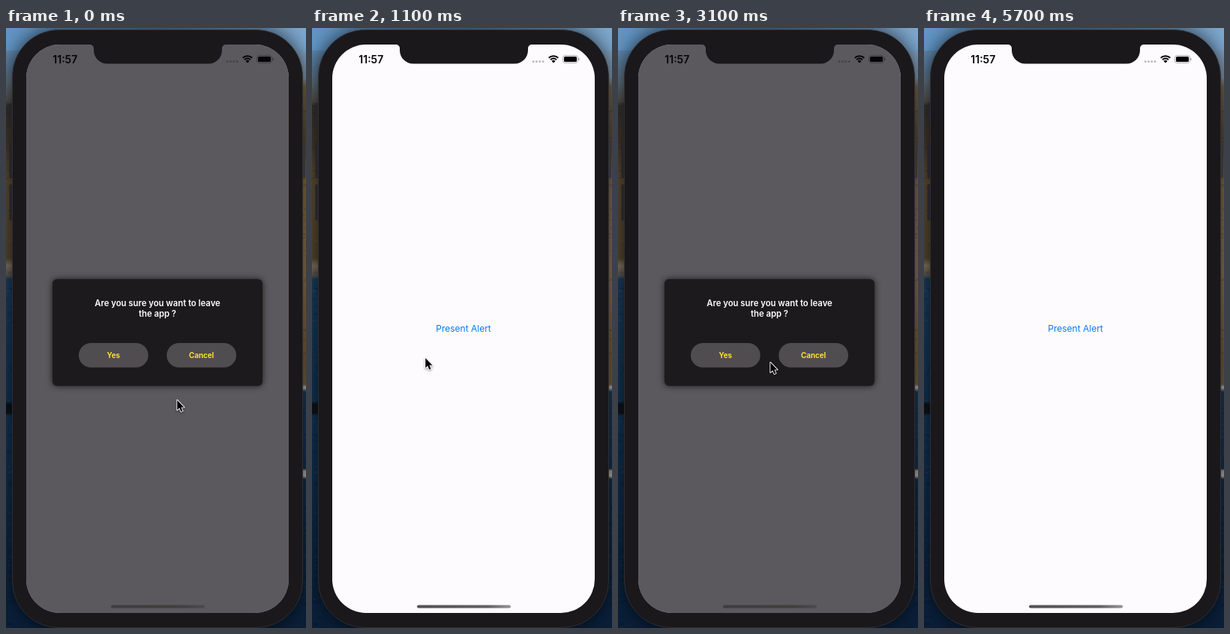
An HTML page with a canvas that plays this animation: 400x798 px, repeating every 5800 ms.

```html
<!DOCTYPE html>
<html lang="en">
<head>
<meta charset="utf-8">
<title>Present Alert</title>
<style>
  html, body { margin: 0; width: 100%; height: 100%; overflow: hidden; background: #1a181b; }
  canvas { display: block; }
</style>
</head>
<body>
<canvas id="stage" width="400" height="798"></canvas>
<script>
const W = 400, H = 798, LOOP = 5800, STEP = 100;
const FONT = 'Inter, Roboto, sans-serif';
const ctx = document.getElementById('stage').getContext('2d');

function makeLayer() {
  const c = document.createElement('canvas');
  c.width = W;
  c.height = H;
  return c.getContext('2d');
}

const clamp = x => Math.max(0, Math.min(1, x));
const mix = (a, b, k) => a + (b - a) * k;
const ease = x => { x = clamp(x); return x * x * (3 - 2 * x); };
const ramp = (t, start, length) => ease((t - start) / length);

function box(c, x, y, w, h, r, fill) {
  c.beginPath();
  c.roundRect(x, y, w, h, r);
  c.fillStyle = fill;
  c.fill();
}

function label(c, text, x, y, size, weight, fill, align = 'center') {
  c.font = `${weight} ${size}px ${FONT}`;
  c.textAlign = align;
  c.fillStyle = fill;
  c.fillText(text, x, y);
}

// Coastal wallpaper: each side is a vertical list of [y, colour]
const LEFT = [[0, '#6296c6'], [50, '#5a7c9c'], [72, '#5f707c'], [98, '#524e48'], [104, '#34302a'],
  [150, '#41372c'], [200, '#5c4a30'], [306, '#54452e'], [316, '#84745f'], [330, '#565250'],
  [334, '#1a3c5e'], [496, '#103252'], [501, '#0d1219'], [512, '#0d1219'], [516, '#113456'],
  [798, '#091e38']];
const RIGHT = [[0, '#7ea8ce'], [66, '#8299b0'], [78, '#786648'], [150, '#544838'], [205, '#826b43'],
  [320, '#8c744e'], [440, '#765e3a'], [474, '#746246'], [478, '#c8c4bc'], [484, '#1a3856'],
  [586, '#123050'], [589, '#b0a494'], [596, '#c0b8ac'], [600, '#122e4c'], [798, '#091e38']];

function strip(c, x, w, stops) {
  const g = c.createLinearGradient(0, 0, 0, H);
  stops.forEach(([y, colour]) => g.addColorStop(y / H, colour));
  c.fillStyle = g;
  c.fillRect(x, 0, w, H);
}

function wallpaper(c) {
  strip(c, 0, 200, LEFT);
  strip(c, 200, 200, RIGHT);
  const sky = c.createLinearGradient(0, 0, W, 0);
  sky.addColorStop(0, '#6296c6');
  sky.addColorStop(0.5, '#54789c');
  sky.addColorStop(1, '#7ea8ce');
  c.fillStyle = sky;
  c.fillRect(0, 0, W, 30);
  let seed = 7;
  const rnd = () => (seed = seed * 16807 % 2147483647) / 2147483647;
  for (let i = 0; i < 200; i++) {
    const y = 105 + rnd() * 690;
    c.fillStyle = rnd() < 0.6 ? 'rgba(0,0,0,.13)' : 'rgba(170,170,160,.06)';
    c.fillRect(rnd() < 0.5 ? rnd() * 8 : 391 + rnd() * 8, y, 2 + rnd() * 4, 1 + rnd() * 2);
  }
}

function phone(c) {
  c.save();
  c.shadowColor = 'rgba(0,0,0,.7)';
  c.shadowBlur = 26;
  box(c, 8.5, 2.5, 387, 795, 62, '#1a181b');
  c.restore();
  [[100, 28], [152, 48], [208, 48]].forEach(([y, h]) => box(c, 4.5, y, 6, h, 1.5, '#252429'));
  box(c, 394, 152, 5, 48, 1.5, '#353436');
  box(c, 8.5, 2.5, 387, 795, 62, '#1a181b');
  c.strokeStyle = '#39383c';
  c.lineWidth = 0.7;
  c.stroke();
}

function screenPath(c) {
  c.beginPath();
  c.roundRect(27, 22, 350, 756, 45);
}

function notch(c) {
  c.beginPath();
  c.moveTo(112, 21);
  c.lineTo(112, 22);
  c.arcTo(117, 22, 117, 27, 5);
  c.arcTo(117, 47.5, 135, 47.5, 18);
  c.arcTo(288, 47.5, 288, 27, 18);
  c.arcTo(288, 22, 293, 22, 5);
  c.lineTo(293, 21);
  c.fillStyle = '#1a181b';
  c.fill();
}

function statusBar(c) {
  label(c, '11:57', 62.3, 46.6, 14, 600, '#000', 'left');
  for (let i = 0; i < 4; i++) box(c, 293.7 + i * 4.3, 43.2, 2.9, 2.9, 1.45, '#b9b7ba');
  c.strokeStyle = '#000';
  c.lineWidth = 2;
  [9, 5.7].forEach(r => {
    c.beginPath();
    c.arc(322, 46.3, r, -Math.PI / 2 - 0.77, -Math.PI / 2 + 0.77);
    c.stroke();
  });
  c.beginPath();
  c.moveTo(322, 46.6);
  c.arc(322, 46.6, 3.6, -Math.PI / 2 - 0.77, -Math.PI / 2 + 0.77);
  c.fillStyle = '#000';
  c.fill();
  c.beginPath();
  c.roundRect(334.6, 36.6, 19.8, 9.8, 2.8);
  c.strokeStyle = '#a3a1a4';
  c.lineWidth = 0.9;
  c.stroke();
  box(c, 336, 38, 17, 7, 1.6, '#000');
  box(c, 355.2, 39.8, 1.3, 3.4, 0.6, '#a3a1a4');
}

function alertView(c, scale) {
  c.clearRect(0, 0, W, H);
  c.fillStyle = 'rgba(9,5,10,.66)';
  c.fillRect(0, 0, W, H);
  c.save();
  c.translate(202, 405);
  c.scale(scale, scale);
  c.translate(-202, -405);
  c.save();
  c.shadowColor = 'rgba(0,0,0,.75)';
  c.shadowBlur = 9;
  box(c, 62, 334, 280, 142, 6, '#1c1a1d');
  c.restore();
  label(c, 'Are you sure you want to leave', 202, 370, 11.3, 600, '#fff');
  label(c, 'the app ?', 202, 383.6, 11.3, 600, '#fff');
  [['Yes', 97], ['Cancel', 214.3]].forEach(([text, x]) => {
    box(c, x, 419, 92.7, 32.6, 16.3, '#504d51');
    label(c, text, x + 46.3, 439, 9.8, 700, '#fce02f');
  });
  c.restore();
}

function homeBar(c, dim) {
  const grey = v => `rgb(${v},${v - 2},${v})`;
  const g = c.createLinearGradient(140, 0, 265, 0);
  g.addColorStop(0, grey(mix(82, 62, dim)));
  g.addColorStop(0.75, grey(mix(98, 64, dim)));
  g.addColorStop(1, grey(mix(150, 76, dim)));
  box(c, 140, 767.6, 125, 4, 2, g);
}

// Pointer stops: [time, x, y]
const PATH = [[0, 228, 494], [100, 226, 492], [600, 151, 438], [1300, 151, 438], [1800, 197, 398],
  [2700, 197, 398], [3100, 203, 444], [3400, 226, 474], [3700, 246, 448], [4100, 266, 437],
  [5350, 266, 437], [5650, 408, 330], [LOOP, 420, 320]];

function pointer(c, t) {
  const i = PATH.findIndex(p => p[0] > t);
  const [t0, x0, y0] = PATH[i - 1], [t1, x1, y1] = PATH[i];
  const k = ramp(t, t0, t1 - t0);
  c.save();
  c.translate(mix(x0, x1, k), mix(y0, y1, k) + 1);
  c.scale(0.92, 0.92);
  c.beginPath();
  [[0.3, 0], [0.3, 14.2], [3.6, 11.1], [5.9, 16.5], [8.2, 15.5], [5.9, 10.2], [10.3, 10.2]]
    .forEach(([x, y]) => c.lineTo(x, y));
  c.closePath();
  c.lineJoin = 'round';
  c.shadowColor = 'rgba(0,0,0,.4)';
  c.shadowBlur = 3;
  c.shadowOffsetY = 1.5;
  c.strokeStyle = '#fff';
  c.lineWidth = 2;
  c.stroke();
  c.shadowColor = 'transparent';
  c.fillStyle = '#000';
  c.fill();
  c.restore();
}

const back = makeLayer();
wallpaper(back);
phone(back);
const sheet = makeLayer();

const OPEN = 2476, FADE = 300;

function draw(t) {
  const opened = t >= OPEN;
  const shown = ramp(t, OPEN, FADE);
  const alpha = opened ? shown * (1 - ramp(t, 4828, FADE)) : 1 - ramp(t, 728, FADE);
  const scale = opened ? 1 + 0.132 * (1 - shown) : 1;
  const linkAlpha = opened ? mix(0.2, 1, clamp((t - OPEN) / 500)) : 1;

  ctx.drawImage(back.canvas, 0, 0);
  ctx.save();
  screenPath(ctx);
  ctx.fillStyle = '#fdfbfe';
  ctx.fill();
  ctx.clip();
  ctx.globalAlpha = linkAlpha;
  label(ctx, 'Present Alert', 202, 404.3, 12, 400, '#007aff');
  ctx.globalAlpha = 1;
  statusBar(ctx);
  if (alpha > 0) {
    alertView(sheet, scale);
    ctx.globalAlpha = alpha;
    ctx.drawImage(sheet.canvas, 0, 0);
    ctx.globalAlpha = 1;
  }
  homeBar(ctx, alpha);
  ctx.restore();
  notch(ctx);
  pointer(ctx, t);
}

function tick() {
  const t = (performance.now() + 8) % LOOP;
  draw(Math.floor(t / STEP) * STEP);
  requestAnimationFrame(tick);
}
draw(0);
requestAnimationFrame(tick);
</script>
</body>
</html>
```
